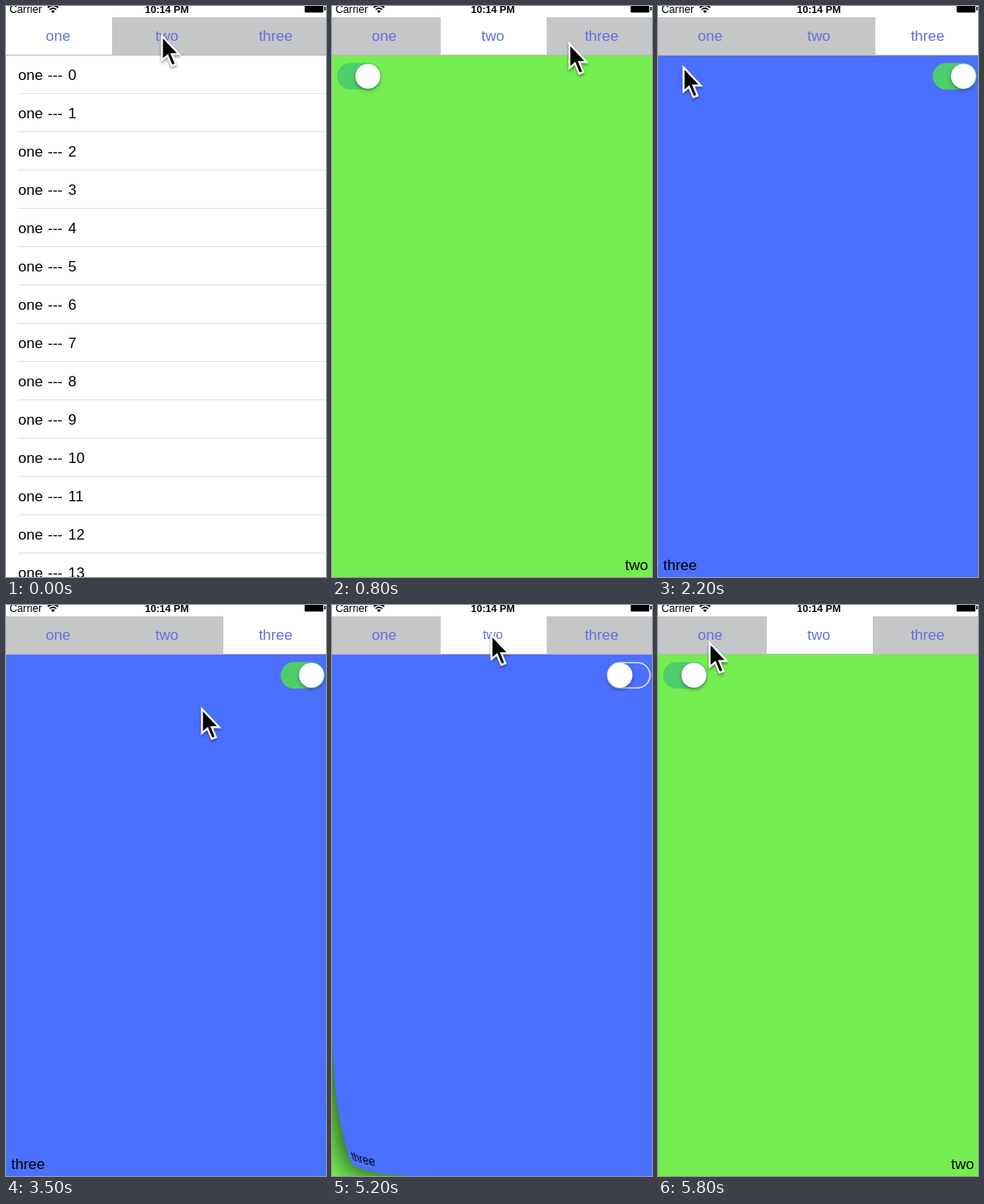
An HTML page with a canvas that plays this animation: 368 px wide and 656 px high, repeating every 5900 ms.

```html
<!DOCTYPE html>
<html lang="en">
<head>
<meta charset="utf-8">
<title>Page curl tabs</title>
<style>
  html, body { margin: 0; width: 100%; height: 100%; overflow: hidden; background: #fff; }
  #stage {
    position: absolute; left: 0; top: 0; width: 368px; height: 656px; overflow: hidden;
    background: #fff; font-family: "Liberation Sans", Arial, sans-serif;
  }
  #status, #cursor { position: absolute; left: 0; top: 0; }
  #tabs { position: absolute; left: 0; top: 13px; width: 368px; height: 44px; background: #c4c6c8; }
  #tabs::after {
    content: ""; position: absolute; left: 0; bottom: 0; width: 100%; height: 1px; background: #b9b9b7;
  }
  .tab {
    position: absolute; top: 0; height: 44px; line-height: 44px;
    text-align: center; font-size: 17px; color: #6371dc;
  }
  .tab.on { background: #fff; }
  .tab span { position: absolute; top: 0; width: 60px; }
  #view { position: absolute; left: 0; top: 57px; }
  #cursor { filter: drop-shadow(0 2px 1.5px rgba(0, 0, 0, .4)); overflow: visible; }
</style>
</head>
<body>
<div id="stage">
  <svg id="status" width="368" height="13">
    <text x="4" y="8" font-size="12.2">Carrier</text>
    <text x="185" y="8" font-size="11.7" font-weight="bold" text-anchor="middle">10:14 PM</text>
    <g fill="none" stroke="#000" stroke-width="1.7">
      <path d="M48 1.8 Q54 -3 60 1.8"/>
      <path d="M50.3 4.2 Q54 1.2 57.7 4.2"/>
    </g>
    <path d="M51.8 5.8 Q54 4 56.2 5.8 L54 8.2 Z"/>
    <rect x="343.5" y="-2" width="21.5" height="9.5" rx="1"/>
    <rect x="366" y="1" width="1.5" height="4"/>
  </svg>
  <canvas id="view" width="368" height="599"></canvas>
  <div id="tabs"></div>
  <svg id="cursor" width="24" height="40">
    <path d="M0 0 V28 L6.3 22.4 L11.3 34.4 L16 32.4 L11.2 21 H19.8 Z"
      fill="#000" stroke="#fff" stroke-width="2.2"/>
  </svg>
</div>
<script>
const W = 368, H = 599, LOOP = 5900, STEP = 100;
const SPEED = 1.1;        // roll travel, px per ms
const CURL_TIME = 600;
const FONT = '17px "Liberation Sans", Arial, sans-serif';

const CURLS = [
  { tap: 100, at: 160, from: 0, to: 1 },
  { tap: 1300, at: 1300, from: 1, to: 2 },
  { tap: 5100, at: 5100, from: 2, to: 1, low: true }
];

// time, x, y of the pointer tip
const POINTER = [
  [0, 178, 33], [300, 178, 33], [500, 199, 41], [700, 240, 46], [1000, 335, 34],
  [1300, 308, 42], [1500, 307, 44], [1700, 300, 46], [2200, 28, 69], [2500, 4, 82],
  [2800, 200, 108], [3000, 335, 104], [3300, 4, 112], [3500, 224, 118],
  [3700, 270, 100], [4000, 338, 80], [4500, 340, 80], [4900, 200, 36],
  [5100, 182, 33], [5300, 182, 33], [5700, 58, 42], [5900, 58, 42]
];

const LABEL_BOUNCE = [[0, 1], [100, .87], [200, 1.15], [300, .97], [400, 1]];

const clamp = v => Math.max(0, Math.min(1, v));
const mix = (a, b, k) => a + (b - a) * k;

function track(keys, t) {
  let i = 0;
  while (i < keys.length - 2 && t > keys[i + 1][0]) i++;
  const [a, b] = [keys[i], keys[i + 1]];
  const k = clamp((t - a[0]) / (b[0] - a[0]));
  return a.slice(1).map((v, j) => mix(v, b[j + 1], k));
}

function layer() {
  const c = document.createElement('canvas');
  c.width = W;
  c.height = H;
  return c.getContext('2d');
}

const view = document.getElementById('view').getContext('2d');
const pageLayer = layer(), front = layer(), flap = layer();
const cursor = document.getElementById('cursor');

const tabs = [['one', 0, 121.5, 60], ['two', 124.5, 122, 185], ['three', 249.5, 118.5, 310]]
  .map(([name, left, width, mid]) => {
    const tab = document.createElement('div');
    const label = document.createElement('span');
    tab.className = 'tab';
    tab.style.left = left + 'px';
    tab.style.width = width + 'px';
    label.textContent = name;
    label.style.left = mid - 30 - left + 'px';
    tab.append(label);
    document.getElementById('tabs').append(tab);
    return { tab, label };
  });

function drawSwitch(g, x, on) {
  const y = 8.5;
  g.save();
  g.beginPath();
  g.roundRect(x, y, 50.5, 30.5, 15.25);
  g.globalAlpha = on;
  g.fillStyle = '#4fcd6c';
  g.fill();
  g.globalAlpha = 1 - on;
  g.beginPath();
  g.roundRect(x + .8, y + .8, 49, 29, 14.5);
  g.strokeStyle = '#dcdfe6';
  g.lineWidth = 1.6;
  g.stroke();
  g.globalAlpha = 1;
  g.shadowColor = 'rgba(0,0,0,.35)';
  g.shadowBlur = 4;
  g.shadowOffsetY = 2;
  g.fillStyle = '#fff';
  g.beginPath();
  g.arc(x + mix(15.2, 35.3, on), y + 15.2, 14.3, 0, 7);
  g.fill();
  g.restore();
}

function drawList(g) {
  for (let i = 0; i < 14; i++) {
    const y = 28 + i * 44;
    g.fillStyle = '#000';
    g.fillText('one', 14, y);
    g.fillText('---', 48, y);
    g.fillText(i, 71.5, y);
    g.fillStyle = '#e3e3e5';
    g.fillRect(14, y + 15, W, 1);
  }
}

function drawPage(g, index, t) {
  g.fillStyle = ['#fff', '#74ed50', '#4b70ff'][index];
  g.fillRect(0, 0, W, H);
  g.fillStyle = '#000';
  g.font = FONT;
  if (index === 0) drawList(g);
  if (index === 1) {
    g.fillText('two', 337, 591);
    drawSwitch(g, 6, 1);
  }
  if (index === 2) {
    g.fillText('three', 6, 591);
    drawSwitch(g, 316, 1 - clamp((t - 4200) / 200));
  }
}

// Distance along the paper -> distance seen from above, for a roll of radius r
function bend(s, r) {
  if (s <= 0) return s;
  const u = s / r - Math.PI / 2;
  if (u <= 0) return r * Math.sin(s / r);
  return u < 2 ? r * (1 - .179 * u ** 2.5) : r * (-.0126 - 1.2 * (u - 2));
}

function backColor(u) {
  const v = u < 1.25 ? mix(125, 197, clamp(u / .8)) : mix(197, 255, clamp((u - 1.25) / .08));
  return `rgb(${v}, ${v}, ${v + 2})`;
}

// Paints the slice of paper s0..s1, squeezed to where the roll carries it
function slice(g, c, s0, s1, paint) {
  const a = bend(s0, c.radius) - c.depth, b = bend(s1, c.radius) - c.depth;
  g.save();
  g.translate(c.x, c.y);
  g.rotate(c.angle);
  g.beginPath();
  g.rect(Math.min(a, b) - .4, -900, Math.abs(b - a) + .8, 1800);
  g.clip();
  g.translate(a, 0);
  g.scale((b - a) / (s1 - s0), 1);
  g.translate(c.depth - s0, 0);
  g.rotate(-c.angle);
  g.translate(-c.x, -c.y);
  paint();
  g.restore();
}

function castShadow(g, source, color, blur, angle, offset) {
  g.save();
  g.shadowColor = color;
  g.shadowBlur = blur;
  g.shadowOffsetX = Math.cos(angle) * offset;
  g.shadowOffsetY = Math.sin(angle) * offset;
  g.drawImage(source, 0, 0);
  g.restore();
}

function drawCurl(curl, t) {
  const depth = (t - curl.at) * SPEED;
  const radius = 80 + depth * .07;
  const tilt = (31.5 - 8.5 * (depth / 375) ** 2) * Math.PI / 180;
  const c = curl.low
    ? { x: 0, y: H, angle: Math.PI - tilt, depth, radius }
    : { x: W, y: 0, angle: -tilt, depth, radius };
  const top = radius * Math.PI / 2;

  drawPage(pageLayer, curl.from, t);
  front.clearRect(0, 0, W, H);
  flap.clearRect(0, 0, W, H);

  // Slices seen almost edge-on are skipped: they are thinner than a pixel
  const paper = () => front.drawImage(pageLayer.canvas, 0, 0);
  slice(front, c, -900, 0, paper);
  for (let s = 0; s < Math.min(top - 8, depth); s += 4) {
    slice(front, c, s, Math.min(s + 4, top - 8), paper);
  }

  for (let s = top + radius * .25; s < depth; s += 4) {
    slice(flap, c, s, s + 4, () => {
      flap.fillStyle = backColor((s - top) / radius);
      flap.fillRect(0, 0, W, H);
    });
  }

  front.globalCompositeOperation = 'source-atop';
  castShadow(front, flap.canvas, 'rgba(60,68,75,.75)', 21, c.angle, -9);
  front.globalCompositeOperation = 'source-over';

  const lift = Math.min(1, depth / 220);
  const alpha = mix(.5, .85, clamp(depth / 375));
  castShadow(view, front.canvas, `rgba(0,0,10,${alpha})`, 52 * lift, c.angle, 16 * lift);
}

function render(t) {
  const curl = CURLS.findLast(c => t >= c.at);
  drawPage(view, curl ? curl.to : 0, t);
  if (curl && t > curl.at && t < curl.at + CURL_TIME) drawCurl(curl, t);

  const tapped = CURLS.findLast(c => t >= c.tap);
  const active = tapped ? tapped.to : 0;
  const bounce = tapped ? track(LABEL_BOUNCE, t - tapped.tap)[0] : 1;
  tabs.forEach(({ tab, label }, i) => {
    tab.classList.toggle('on', i === active);
    label.style.transform = `scale(${i === active ? bounce : 1})`;
  });

  const [x, y] = track(POINTER, t);
  cursor.style.transform = `translate(${x + 1.4}px, ${y + 1.4}px)`;
}

const start = performance.now();
function frame() {
  const t = (performance.now() - start) % LOOP;
  render(Math.floor(t / STEP) * STEP);
  requestAnimationFrame(frame);
}
frame();
</script>
</body>
</html>
```
